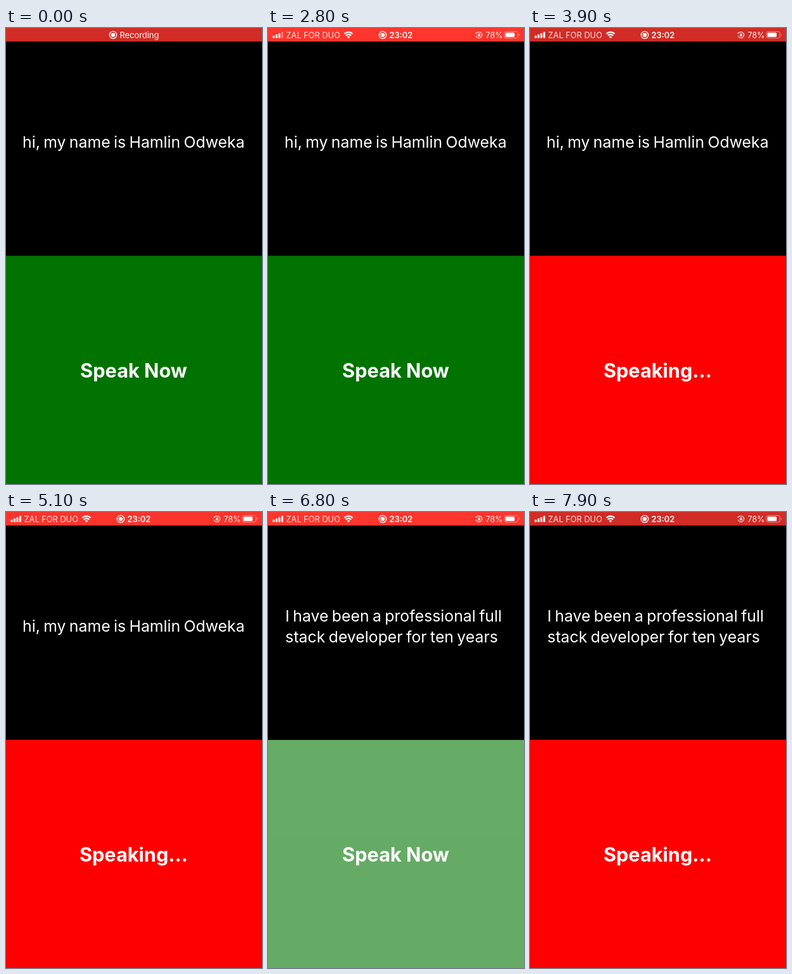
An HTML page for the animation above (8 s loop, 404x720 px).

```html
<!DOCTYPE html>
<html lang="en">
<head>
<meta charset="utf-8">
<title>Speech to text</title>
<style>
  html, body { margin: 0; width: 100%; height: 100%; overflow: hidden; background: #fff; }
  svg { display: block; width: 404px; height: 720px; }
  text { font-family: Inter, "Liberation Sans", sans-serif; fill: #fff; }
  .said { font-size: 24.8px; word-spacing: -1.6px; }
  .label { font-size: 30.7px; font-weight: 700; text-anchor: middle; }
  .bar { font-size: 12.9px; }
  .line { fill: none; stroke: #fff; }
</style>
</head>
<body>
<svg viewBox="0 0 404 720">
  <defs>
    <g id="record">
      <circle class="line" r="5.7" stroke-width="1.3"/>
      <circle r="3.3" fill="#fff"/>
    </g>
  </defs>
  <rect width="404" height="360"/>
  <rect id="top" width="404" height="21.4"/>

  <g id="recording" class="bar">
    <use href="#record" x="169" y="11"/>
    <text x="179.5" y="15.6">Recording</text>
  </g>

  <g id="status" class="bar">
    <g fill="#fff">
      <rect x="7.5" y="12" width="3" height="4" rx=".7"/>
      <rect x="12" y="10" width="3" height="6" rx=".7"/>
      <rect x="16.5" y="8" width="3" height="8" rx=".7"/>
      <rect id="signal" x="21" y="6" width="3" height="10" rx=".7"/>
    </g>
    <text x="28.5" y="15.5" font-size="12.8" opacity=".85">ZAL FOR DUO</text>
    <g class="line" stroke-width="2.2">
      <path d="M120.3 9.3Q127 3.3 133.7 9.3M122.8 12Q127 8.3 131.2 12"/>
    </g>
    <path d="M124.6 14Q127 12.1 129.4 14L127 16.6Z" fill="#fff"/>
    <use href="#record" x="181" y="11"/>
    <text x="191.5" y="15.6" font-weight="600">23:02</text>
    <g opacity=".9">
      <path class="line" stroke-width="1.1" d="M329 8.1A4.8 4.8 0 1 1 328.2 12.2M332 10.8V9.8A1.1 1.1 0 0 1 334.2 9.8V10.8"/>
      <path fill="#fff" d="M327.2 7.4L330.2 7.4 328.4 9.8ZM331.2 10.6H335V13.2H331.2Z"/>
    </g>
    <text x="343.5" y="15.5" font-size="12.6" opacity=".9">78%</text>
    <rect class="line" x="373" y="5.5" width="21.5" height="10.5" rx="3" opacity=".45"/>
    <rect x="374.7" y="7.2" width="14.5" height="7.1" rx="1.5" fill="#fff"/>
    <path d="M396 9Q398.4 10.8 396 12.6Z" fill="#fff" opacity=".45"/>
  </g>

  <text id="intro" class="said" x="201.3" y="189.3" text-anchor="middle">hi, my name is Hamlin Odweka</text>
  <g id="reply" class="said">
    <text x="27.3" y="173.3">I have been a professional full</text>
    <text x="27.3" y="206">stack developer for ten years</text>
  </g>

  <g id="button">
    <rect id="panel" y="359.6" width="404" height="360.4"/>
    <text id="label" class="label" x="201.5" y="551.6">Speak Now</text>
  </g>
</svg>
<script>
const LOOP = 8000, STEP = 100;
const el = id => document.getElementById(id);
const set = (id, name, value) => el(id).setAttribute(name, value);
const ramp = (t, from, to) => Math.min(1, Math.max(0, (t - from) / (to - from)));

// Each tap: dim starts, dim ends, release starts, release ends
const taps = [[3000, 3160, 3330, 3580], [5440, 5560, 5620, 5850], [6720, 6880, 6985, 7235]];

function draw(t) {
  const glow = (1 - Math.cos((t + 100) * Math.PI / 1000)) / 2;
  const mix = (a, b) => Math.round(a + (b - a) * glow);
  set('top', 'fill', `rgb(${mix(209, 255)},${mix(44, 54)},${mix(38, 45)})`);

  const swap = ramp(t, 2000, 2300);
  set('recording', 'opacity', 1 - swap);
  set('status', 'opacity', swap);
  set('signal', 'opacity', t < 3500 ? .35 : 1);

  let dim = 0, toggles = 0;
  for (const [down, held, up, done] of taps) {
    dim += ramp(t, down, held) - ramp(t, up, done);
    if (t >= up) toggles++;
  }
  const speaking = toggles % 2 === 1;
  set('button', 'opacity', 1 - .8 * dim);
  set('panel', 'fill', speaking ? '#f00' : '#007300');
  el('label').textContent = speaking ? 'Speaking...' : 'Speak Now';

  const replied = toggles > 1;
  set('intro', 'opacity', replied ? 0 : 1);
  set('reply', 'opacity', replied ? 1 : 0);
}

const start = performance.now();
function tick() {
  const t = (performance.now() - start) % LOOP;
  draw(Math.floor(t / STEP) * STEP);
  requestAnimationFrame(tick);
}
tick();
</script>
</body>
</html>
```
